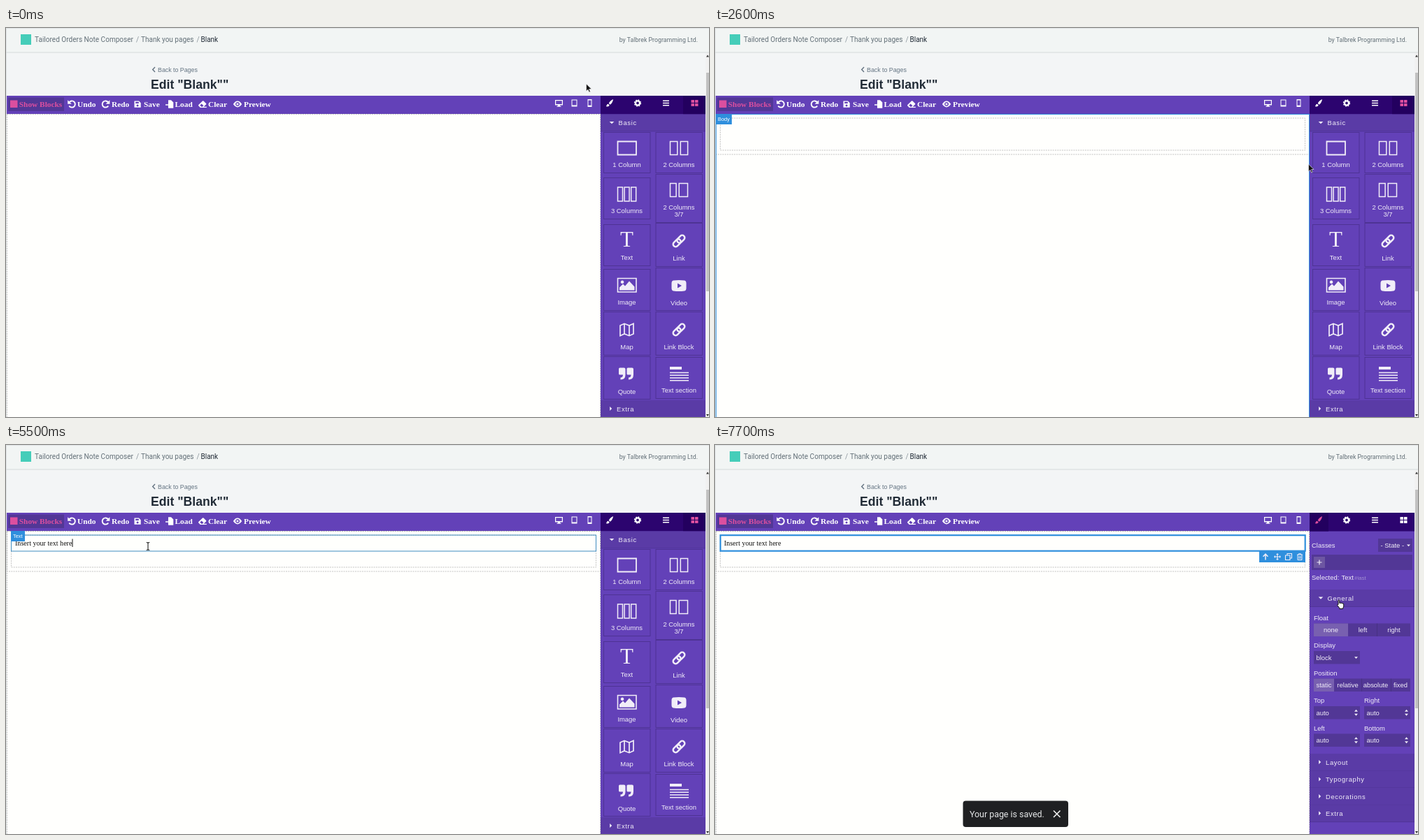
Recreate the animation shown at these times as an HTML page. Size 1005 px wide and 557 px high, loop 8000 ms.

```html
<!DOCTYPE html>
<html lang="en">
<head>
<meta charset="utf-8">
<title>Page editor</title>
<style>
html, body { margin: 0; width: 100%; height: 100%; overflow: hidden; background: #f3f5f6; }
svg { display: block; width: 100%; height: 100%; font-family: "Liberation Sans", Arial, sans-serif; }
text { white-space: pre; }
.roboto { font-family: Roboto, sans-serif; }
.serif { font-family: "Liberation Serif", "Times New Roman", serif; }
.mid { text-anchor: middle; }
.end { text-anchor: end; }
.title { letter-spacing: .63px; }
</style>
</head>
<body>
<svg id="stage" viewBox="0 0 1005 557"></svg>
<script>
const LOOP = 8000;
const PURPLE = '#6341b8', TITLE = '#5a3ba6', FIELD = '#523796', PICKED = '#7860b0',
      PINK = '#dc4f9f', PALE = '#f1edf8', BLUE = '#2f8fdd', GREEN = '#10e254', AMBER = '#fbc55f';

const rect = (x, y, w, h, fill, more = '') =>
  `<rect x="${x}" y="${y}" width="${w}" height="${h}" fill="${fill}" ${more}/>`;
const frame = (x, y, w, h, color, width = 1, more = '') =>
  rect(x, y, w, h, 'none', `stroke="${color}" stroke-width="${width}" ${more}`);
const text = (x, y, s, size = 9.45, fill = PALE, cls = '', more = '') =>
  `<text x="${x}" y="${y}" font-size="${size}" fill="${fill}" class="${cls}" ${more}>${s}</text>`;
const fill = (d, color = 'currentColor') => `<path d="${d}" fill="${color}" fill-rule="evenodd"/>`;
const line = (d, width = 1.5, color = 'currentColor') =>
  `<path d="${d}" fill="none" stroke="${color}" stroke-width="${width}"/>`;
const at = (x, y, s, more = '') => `<g transform="translate(${x} ${y}) ${more}">${s}</g>`;
const box = (x, y, w, h) => `M${x} ${y}h${w}v${h}h${-w}z`;
const dashed = (x, y, w, h) => frame(x, y, w, h, '#b4b4b4', .8, 'stroke-dasharray="2 1.3"');

// ---------- icons, drawn around 0,0 ----------
const link = `<g transform="rotate(-45)">${[-10.2, -2.3].map(x =>
  `<rect x="${x}" y="-3.6" width="12.5" height="7.2" rx="3.6" fill="none" stroke="currentColor" stroke-width="2.5"/>`).join('')}</g>`;
const quote = 'M-10-8.5h6q2 0 2 2v8q0 7-7 7v-3q3.5 0 3.5-4h-4.500q-1.500 0-1.500-1.500v-7q0-1.500 1.500-1.500z';
const turn = line('M-3.400-2.800a4.600 4.600 0 1 1-.3 5.200', 1.9) + fill('M-5.800-5.800v5.600h5.600z');
const grid = fill(box(-5, -4.5, 4.5, 4) + box(.5, -4.5, 4.5, 4) + box(-5, .5, 4.5, 4) + box(.5, .5, 4.5, 4));
const brush = fill('M5-5.500q-5 2.500-6.200 6l2 1.800q3.700-3 4.200-7.800zM-2 1.200q-2 0-2.300 2-.2 1-1 1.200 3.800 1.600 5-1.200z');
const gear = `<circle r="3.1" fill="none" stroke="currentColor" stroke-width="2.4"/>` +
  `<circle r="4.500" fill="none" stroke="currentColor" stroke-width="1.400" stroke-dasharray="1.770"/>`;
const bars = line('M-4.500-3.200h9M-4.500 0h9M-4.500 3.200h9', 1.5);
const undo = turn, redo = `<g transform="scale(-1 1)">${turn}</g>`;
const save = fill('M-4.500-4.500h6.500l2.700 2.700v6.500h-9.200z' + box(-2.8, -3.2, 4.6, 2.3) + 'M0 .5a1.500 1.500 0 1 0 .1 0z');
const load = fill('M-2-5.800h4l3.300 3.300v8.300h-7.300z') + line('M-6 1h6M-2-1.500l2.500 2.500-2.500 2.500', 1.3) ;
const clear = fill('M-5.700 1l5.700-5.500q.7-.7 1.400 0l3.600 3.500q.7.7 0 1.400l-3.500 3.400h4.300v1.300h-9l-2.500-2.500q-.7-.8 0-1.600zM-3.700 1.800l2 2h1.600l1.500-1.500-2.800-2.800z');
const eye = fill('M-6.200 0q6.200-8.800 12.400 0-6.200 8.800-12.400 0zM0-3a3 3 0 1 0 .1 0zM0-1.600a1.600 1.600 0 1 1-.1 0z');
const desktop = fill('M-5.500-4.500h11v7.500h-4l.5 1.500h1v.8h-6v-.8h1l.5-1.500h-4z' + box(-4.3, -3.3, 8.6, 4.7));
const tablet = fill('M-4-5h8v10h-8z' + box(-3, -4, 6, 7));
const mobile = fill('M-3-5.500h6v11h-6z' + box(-2, -4, 4, 7.2));
const caretDown = fill('M-3.300-1.600h6.600l-3.300 3.300z'), caretRight = fill('M-1.500-3v6l3-3z');

// ---------- building blocks of the side panel ----------
const blocks = [
  [0, 149, 59, 172, 199, '1 Column', line(box(-13, -9.5, 26.5, 19), 1.8)],
  [1, 149, 59, 172, 199, '2 Columns', line(box(-12.5, -9.5, 10.3, 19) + box(2.3, -9.5, 10.3, 19))],
  [0, 214, 60, 238, 265, '3 Columns', line([-13, -3.4, 6.2].map(x => box(x, -10, 7, 20)).join(''))],
  [1, 209, 70, 232, 259.5, '2 Columns', line(box(-12.5, -9.5, 8.6, 19) + box(.2, -9.5, 12.3, 19))],
  [0, 281, 60, 303, 332, 'Text', text(0, 10, 'T', 31, 'currentColor', 'serif mid')],
  [1, 279, 63, 305, 333, 'Link', link],
  [0, 345, 60, 368, 395.5, 'Image', line(box(-13, -9.5, 26.5, 19.500), 1.6) +
    fill('M-10.500 7.500v-4l5-5 3 3 6-7 7.500 8v5zM-6.500-6.500a2.300 2.300 0 1 0 .1 0z')],
  [1, 343, 62, 369, 397, 'Video', fill('M-8-7.500q8-1 16 0 2.500.5 2.500 4v7q0 3.500-2.500 4-8 1-16 0-2.500-.5-2.500-4v-7q0-3.500 2.500-4zM-2-3.500v7l6-3.500z')],
  [0, 406, 63, 432, 460, 'Map', line('M-9.500-6l6-2.700 7 2.700 6-2.700v14.700l-6 2.700-7-2.700-6 2.700zM-3.500-8.500v14.500M3.500-6v14.500', 1.7)],
  [1, 406, 63, 432, 460, 'Link Block', link],
  [0, 470, 62, 495, 523.5, 'Quote', fill(quote) + at(11.5, 0, fill(quote))],
  [1, 471, 60, 495, 522, 'Text section', fill(box(-13, -10, 17, 4)) + line('M-13-1.500h27M-13 2.200h27M-13 6h27M-13 9.700h27', 1.4)]
];
const blockLeft = b => b[0] ? 928.5 : 854;
const inside = (b, [x, y]) => x > blockLeft(b) && x < blockLeft(b) + 67 && y > b[1] && y < b[1] + b[2];

function block(b, hot) {
  const [, top, h, iconY, labelY, label, icon] = b, left = blockLeft(b), mid = left + 33.5;
  const color = hot ? PINK : PALE;
  return rect(left, top, 67.5, h, PURPLE) + frame(left + .5, top + .5, 66.5, h - 1, '#4d3291', .9) +
    `<g color="${color}">${at(mid, iconY, icon)}</g>` + text(mid, labelY, label, 9.45, color, 'mid') +
    (b === blocks[3] ? text(mid, 270, '3/7', 9.45, color, 'mid') : '');
}

function title(mid, label, open) {
  return rect(850, mid - 12, 150, 24.3, TITLE) + rect(850, mid + 12, 150, .8, '#4d3291') +
    at(open ? 866 : 864.7, mid, open ? caretDown : caretRight) +
    text(open ? 875.5 : 873, mid + 3.6, label, 9.45, PALE, 'title');
}

const blockPanel = hot => title(135.5, 'Basic', true) +
  blocks.map(b => block(b, b === hot)).join('') + title(545, 'Extra');

function radios(y, names, edges, mids) {
  return rect(856, y, 138, 18.5, FIELD) + rect(856, y, edges[0] - 856, 18.5, PICKED) +
    edges.slice(1).map(x => rect(x, y, .8, 18.5, '#47307f')).join('') +
    names.map((n, i) => text(mids[i], y + 12.7, n, 9.45, PALE, 'mid')).join('');
}

const label = (x, y, s) => text(x, y, s);
function field(x, y, value, arrows) {
  return rect(x, y, 66, 18.5, FIELD) + text(x + 3.5, y + 12.5, value) +
    at(x + 60.5, y + 9.3, arrows ? fill('M-2.500-1.500h5l-2.500-3zM-2.500 1.500h5l-2.500 3z') : fill('M-2.500-1h5l-2.500 2.700z'));
}

function stylePanel(t) {
  let s = label(853, 147, 'Classes') + rect(948, 134, 49, 19, FIELD) + text(951.5, 147, '- State -') +
    at(991.5, 143.5, fill('M-2.500-1h5l-2.500 2.700z'));
  if (t < 5900) return s;
  const open = t >= 7700;
  s += rect(853, 157, 144, 22, FIELD) + rect(856, 160, 16, 16, '#6d56a2') +
    at(864, 168, line('M-3.500 0h7M0-3.500v7', 1.2)) + text(853, 193, 'Selected:') + text(895.5, 193, 'Text') +
    text(914, 193, '#iast', 7.9, '#a28fd2') + title(219, 'General', open);
  ['Layout', 'Typography', 'Decorations', 'Extra'].forEach((n, i) =>
    s += title((open ? 454 : 243.5) + i * 24.45, n));
  if (!open) return s;
  return s + label(856, 250.5, 'Float') + radios(255.5, ['none', 'left', 'right'], [905, 946], [880.5, 926, 970.5]) +
    label(856, 290, 'Display') + field(856, 295, 'block') +
    label(856, 329.500, 'Position') +
    radios(334.5, ['static', 'relative', 'absolute', 'fixed'], [885, 924, 966], [870.5, 904.5, 944.5, 980]) +
    label(856, 369, 'Top') + label(928, 369, 'Right') + field(856, 374, 'auto', 1) + field(928, 374, 'auto', 1) +
    label(856, 408.5, 'Left') + label(928, 408.5, 'Bottom') + field(856, 413.5, 'auto', 1) + field(928, 413.5, 'auto', 1);
}

// ---------- page header, toolbar, scrollbar ----------
const tools = [[88, 94, 102, 'Undo', undo], [137, 142.5, 151, 'Redo', redo], [183, 188, 197, 'Save', save],
  [228, 234, 241.5, 'Load', load], [275, 281, 289, 'Clear', clear], [324, 331, 340, 'Preview', eye]];

const chrome = rect(0, 0, 1005, 557, '#f3f5f6') + rect(0, 0, 1005, 35, '#f2f5f4') +
  rect(0, 0, 1005, 1, '#dfe3e4') + rect(0, 0, 1, 557, '#dfe3e4') + rect(0, 34.500, 1005, 1, '#d5dadb') +
  rect(21, 9, 15, 15, '#45cdb9') +
  text(41, 20.300, 'Tailored Orders Note Composer', 10.05, '#637078', 'roboto') +
  text(186, 20.300, '/', 10.05, '#8a949b', 'roboto') +
  text(193, 20.300, 'Thank you pages', 10, '#637078', 'roboto') +
  text(272.5, 20.300, '/', 10.05, '#8a949b', 'roboto') +
  text(278.5, 20.300, 'Blank', 10, '#212b36', 'roboto') +
  text(989, 20, 'by Talbrek Programming Ltd.', 8.8, '#637078', 'roboto end') +
  line('M213 56l-3.300 3.500 3.300 3.500', 1.4, '#637381') + text(217, 62.700, 'Back to Pages', 8.82, '#637381') +
  text(207, 86.800, 'Edit "Blank""', 17.64, '#212b36', '', 'font-weight="700"') +
  rect(1, 97, 849, 26, PURPLE) + rect(3, 99.5, 80, 19.5, FIELD) + rect(6, 103.500, 10.5, 10.5, PINK) +
  text(18.800, 113, 'Show Blocks', 11.34, PINK, 'serif', 'font-weight="700"') +
  `<g color="#fff">` + tools.map(([, x, tx, name, icon]) =>
    at(x, 109, icon) + text(tx, 113, name, 11.34, '#fff', 'serif', 'font-weight="700"')).join('') +
  at(790.5, 107.5, desktop) + at(812.5, 107.5, tablet) + at(834.5, 107.5, mobile) + '</g>' +
  rect(850, 97, 150, 460, PURPLE) + rect(850, 97, 150, 26.5, '#2c046f') +
  rect(1000, 36, 5, 521, '#f1f1f1') + rect(1001, 64, 4, 313, '#c1c1c1') +
  fill('M1001 41.500h4l-2-3zM1001 553h4l-2 3z', '#333') + rect(1, 123, 849, 434, '#fffffd');

function tabs(styling) {
  return rect(styling ? 850 : 968, 97, styling ? 27 : 32, 26.5, '#23005f') +
    [[863, brush], [903, gear], [943.5, bars], [984.5, grid]].map(([x, icon], i) =>
      `<g color="${i === (styling ? 0 : 3) ? PINK : '#fff'}">${at(x, 107.5, icon)}</g>`).join('');
}

// ---------- pointer ----------
const path = [[600, 829.5, 80], [1000, 893, 180], [1100, 893, 180], [1200, 847, 184], [1300, 737, 219],
  [1400, 661, 242], [2100, 661, 242], [2200, 657, 235], [2300, 657, 235], [2500, 780, 207], [2600, 848.5, 195],
  [2800, 907, 220], [2900, 907, 220], [3400, 893, 308], [3600, 878, 296], [3800, 680, 208], [3900, 520, 172],
  [4000, 380, 168], [4100, 276, 169], [4200, 275, 168], [4300, 275, 168], [4900, 203, 145], [6100, 203, 145],
  [6300, 300, 166], [6500, 540, 206], [6700, 790, 226], [6900, 894, 228]];

function pointerAt(t) {
  const i = path.findIndex(k => k[0] >= t);
  if (i < 0) return path[path.length - 1].slice(1);
  if (!i) return path[0].slice(1);
  const [t0, x0, y0] = path[i - 1], [t1, x1, y1] = path[i], k = (t - t0) / (t1 - t0);
  return [x0 + (x1 - x0) * k, y0 + (y1 - y0) * k];
}

const shape = d => `<path d="${d}" fill="#fff" stroke="#111" stroke-width="1" stroke-linejoin="round"/>`;
const cursors = {
  arrow: `<path d="M0 0v10.500l2.500-2.300 1.700 3.800 1.700-.8-1.700-3.700h3.400z" fill="#111" stroke="#fff" stroke-width=".6"/>`,
  grab: shape('M-3-3q1-1.800 2.300-.6 1.200-1.400 2.400 0 1.300-.8 2 .5 1.500-.3 1.500 1.500v3q0 1.600-1.200 3v1.600h-5.800v-1.400l-3.300-3.600q-.5-1.800 1.400-1.500l.9.500z'),
  point: shape('M-3-5.500q1-1 1.800 0v4q1-.8 2 0 1-.6 2 .3 1.800-.3 1.900 1.400v2.500q0 1.500-1 2.500v1.300h-5v-1.200l-3-3.800q-.2-1.500 1.300-.9z'),
  beam: line('M-2.300-5.500q2 0 2.300 1 .3-1 2.300-1M0-4.500v9M-2.300 5.500q2 0 2.300-1 .3 1 2.300 1', 1.1, '#222')
};

// ---------- canvas area ----------
const tag = (x, w, s) => rect(x, 123, w, 15, BLUE) + text(x + 3, 133, s, 7.4, '#fff');
const dropLine = (x, y, w) => rect(x, y - 1.1, w, 2.2, GREEN) +
  fill(`M${x} ${y - 3}l4 3-4 3zM${x + w} ${y - 3}l-4 3 4 3z`, GREEN);

function formatBar() {
  let s = rect(7, 152, 80, 20.5, PURPLE) + frame(7.5, 152.5, 79, 19.5, '#4d3291');
  'BIUS'.split('').forEach((c, i) => s += rect(22.6 + i * 15.8, 152.5, .8, 19.5, '#4d3291') +
    text(15 + i * 15.8, 164, c, 5.2, PALE, 'mid', ['font-weight="700"', 'font-style="italic"',
      'text-decoration="underline"', 'text-decoration="line-through"'][i]));
  return s + at(78, 162, line('M0-4l4 4-4 4-4-4z', 1, PALE));
}

const itemBar = rect(778, 152, 66, 16, BLUE) +
  at(787, 160, line('M0 4.500v-8M-3.500-.2l3.500-3.600 3.500 3.600', 1.5)) +
  at(804, 160, line('M-4 0h8M0-4v8', 1.2) + fill('M-5 0l2-2v4zM5 0l-2-2v4zM0-5l2 2h-4zM0 5l2-2h-4z')) +
  at(820, 160, line(box(-4.5, -2, 6.5, 6.5) + 'M-2-2v-2.500h6.500v6.500h-2.500', 1.1)) +
  at(836, 160, line('M-4-3h8M-1.500-3v-1.300h3v1.300M-3-3v7.500h6v-7.500M-1-1v4M1-1v4', 1));

function canvas(t, p, drag) {
  const picked = t >= 5600, [x, y] = p;
  let s = dashed(1.5, 123.5, 848, 440);
  if (t >= 1600) s += dashed(1.5, 123.5, 848, 57.5) + dashed(7.5, 129, 836, 46);
  if (drag && x < 850) {
    const cell = t > 1600 && y < 175;
    s += cell ? frame(7.5, 129, 836, 46, AMBER, 1.7) + dropLine(9, 139, 833)
              : frame(2, 123.500, 847.5, 440, '#f0cb94', 2) + dropLine(4, 126.5, 843);
  }
  if (!drag && t >= 1700 && x < 850 && y > 181) s += frame(1.5, 123.5, 848, 440, BLUE) + tag(1, 23, 'Body');
  if (t < 4400) return s;
  s += text(13, 144, 'Insert your text here', 10.08, '#111', 'serif');
  if (t >= 5100 && t < 7200) s += rect(t < 5500 ? 13 : 94.5, 134.5, 1, 11.5, '#111');
  if (picked) s += frame(7.7, 129.200, 836, 22.5, BLUE, 2.2) + itemBar;
  else if (t >= 4600) s += frame(7.5, 129, 836, 23, '#3f8cc0') + tag(7, 20, 'Text');
  if (t >= 5900 && t < 7200) s += formatBar();
  return s;
}

function toast(t) {
  if (t < 7200) return '';
  const k = Math.min(1, (t - 7100) / 400);
  return at(0, 47 * (1 - k) ** 2, rect(354.5, 509.5, 150.5, 37.5, '#1f2022', 'rx="4"') +
    text(364, 532.500, 'Your page is saved.', 12.4, '#e6e8e9', 'roboto') +
    line('M484 523.500l9.500 9.500M493.500 523.500l-9.500 9.500', 1.6, '#f0f0f0'));
}

function scene(t) {
  const p = pointerAt(t), styling = t >= 5600;
  const drag = t >= 1200 && t < 1600 ? blocks[0] : t >= 3500 && t < 4400 ? blocks[4] : null;
  const hover = !styling && blocks.find(b => inside(b, p));
  let kind = 'arrow', ghost = '';
  if (drag || hover || (t >= 1600 && t < 2200)) kind = 'grab';
  else if (t >= 5100 && p[1] < 152) kind = 'beam';
  else if (styling && p[0] > 850) kind = 'point';
  if (drag) {
    // the dragged copy runs slightly ahead of the drawn pointer
    const [gx, gy] = pointerAt(t + 100);
    ghost = `<g opacity=".72">${at(gx - 35 - blockLeft(drag), gy - 37 - drag[1], block(drag, true))}</g>`;
  }
  return chrome + tabs(styling) + `<g color="#f1edf8">` +
    (styling ? stylePanel(t) : blockPanel(drag || hover)) + canvas(t, p, drag) + ghost + '</g>' +
    toast(t) + at(p[0], p[1], cursors[kind]);
}

const stage = document.getElementById('stage');
let shown = -1;
function tick() {
  const t = Math.floor(performance.now() % LOOP / 100) * 100;
  if (t !== shown) stage.innerHTML = scene(shown = t);
  requestAnimationFrame(tick);
}
tick();
</script>
</body>
</html>
```
